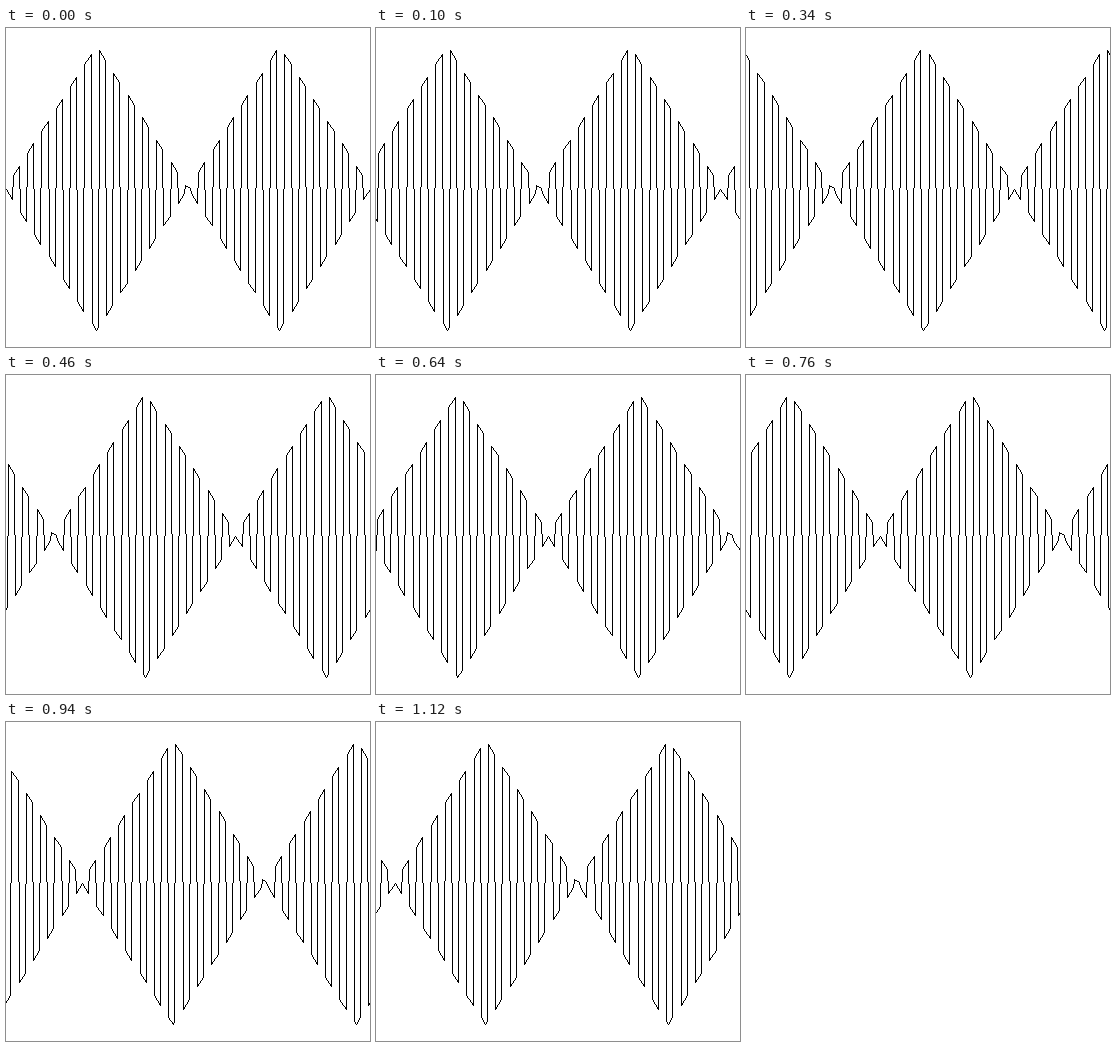
Write a matplotlib script that moves like this. It is 364 by 319 pixels and loops after 1180 ms.

```python
import numpy as np
import matplotlib.pyplot as plt
from matplotlib.animation import FuncAnimation

W, H, DPI = 364, 319, 100
STEPS = 19            # scroll positions per loop
TICK = 20             # ms
TICKS = 59
BASE = 160            # axis of the wave
SEG = 7.18            # half a carrier period
NODE = 181


def envelope(x):
    """Triangular amplitude, nearly zero at both nodes of a half pattern."""
    return np.minimum(1.555 * np.minimum(x, NODE - x) + 1.4, 142)


def half_wave():
    points = []
    for k in range(25):
        left, right = k * SEG, (k + 1) * SEG - 1
        xs = [left, right]
        if left < NODE / 2 < right:
            xs.insert(1, NODE / 2)
        sign = 1 if k % 2 == 0 else -1
        points += [(x, BASE + sign * envelope(x)) for x in xs]
    return np.array(points)


def full_wave():
    """The half pattern, a small hump at the node, then its mirror image."""
    half = half_wave()
    hump = [(179.5, 157.4), (184.3, 159.6)]
    mirror = half[::-1] * (-1, 1) + (W, 0)
    return np.vstack([half, hump, mirror[:-1]])


def draw(points):
    """Trace a one-pixel polyline on a white stage."""
    stage = np.full((H, W), 255, np.uint8)
    for (x0, y0), (x1, y1) in zip(points[:-1], points[1:]):
        n = max(abs(x1 - x0), abs(y1 - y0)) + 1
        xs = np.rint(np.linspace(x0, x1, n)).astype(int)
        ys = np.rint(np.linspace(y0, y1, n)).astype(int)
        seen = (xs >= 0) & (xs < W)
        stage[ys[seen], xs[seen]] = 0
    return stage


cycle = full_wave()
wave = np.vstack([cycle + (n * W, 0) for n in (-1, 0, 1, 2)])

fig = plt.figure(figsize=(W / DPI, H / DPI), dpi=DPI, facecolor="white")
ax = fig.add_axes([0, 0, 1, 1])
ax.axis("off")
image = ax.imshow(np.full((H, W), 255, np.uint8), cmap="gray", vmin=0,
                  vmax=255, interpolation="nearest", aspect="auto")


def update(i):
    # the first position holds for 100 ms, the others for 60 ms
    step = 0 if i < 5 else (i - 5) // 3 + 1
    x = np.floor(wave[:, 0] - step * W / STEPS)
    y = np.rint(wave[:, 1])
    image.set_data(draw(np.column_stack([x, y]).astype(int)))
    return image,


anim = FuncAnimation(fig, update, frames=TICKS, interval=TICK,
                     repeat=True, repeat_delay=0)
plt.show()
```
